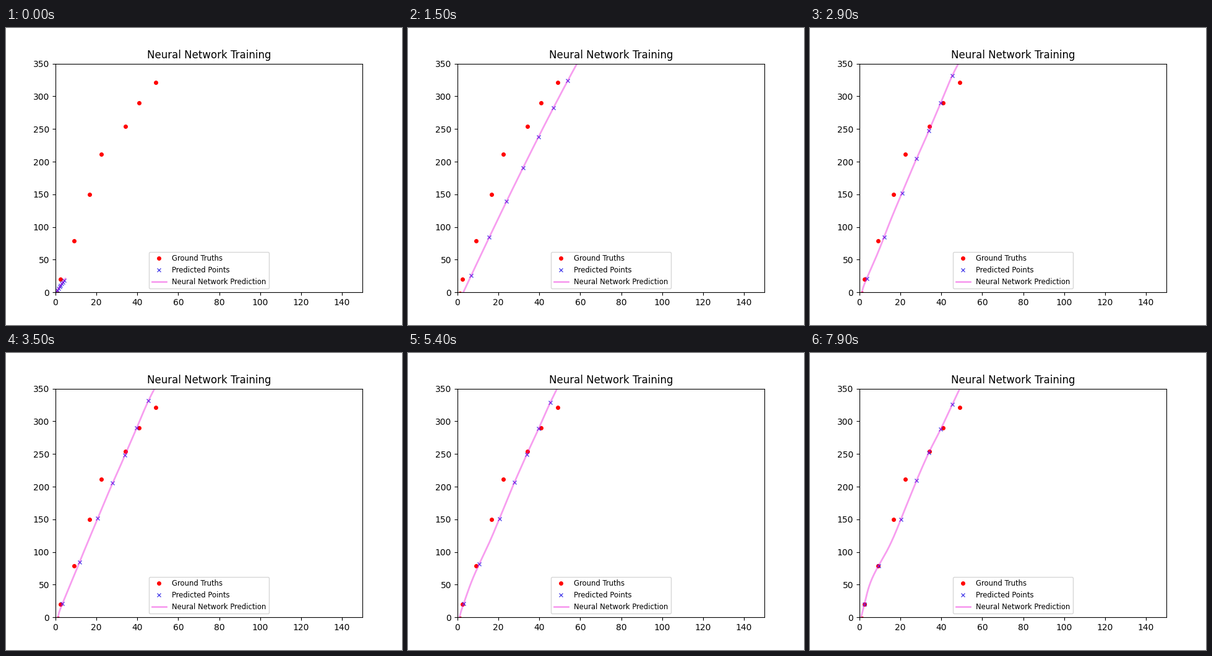
These frames come from a looping animation (640x480 px, 8000 ms). A matplotlib script:

```python
import numpy as np
import matplotlib.pyplot as plt
from matplotlib.animation import FuncAnimation

FRAMES = 80
STEP_MS = 100
MARKS = np.arange(8)                  # inputs of the predicted points
INPUTS = np.linspace(-1, 8.2, 300)    # inputs of the drawn curve

truth_x = [1.1, 2.4, 9.1, 16.6, 22.4, 34.2, 40.8, 49.0]
truth_y = [-1.3, 20, 78.8, 150, 211, 254, 290, 321.2]

# The curve both outputs finally settle on, at each mark
FINAL = np.array([[0.6, 2.4, 9.3, 20.2, 27.9, 33.9, 39.7, 45.4],
                  [-3, 20, 78.8, 149.8, 209.5, 252.1, 288, 326]])

# Early fits are parabolas: start frame, easing rate, x and y coefficients
EARLY = [(0, 0, [[0, 0.54, 0.4], [0, 2.43, 1]]),
         (4, 1.1, [[0, 17, 14], [0, 33, 24]]),
         (9, 1.3, [[-0.12, 10.75, 9.9], [-0.74, 46.9, 33.3]]),
         (15, 3.5, [[-0.19, 9.38, -2.5], [-1.73, 63.5, -36]])]
BEND_START = 29


def ease(u, rate):
    return u if rate == 0 else np.expm1(-rate * u) / np.expm1(-rate)


def catmull_rom(values, t):
    """Smooth curve through the marks, straight beyond both ends."""
    first, last = values[1] - values[0], values[-1] - values[-2]
    p = np.concatenate([values[0] + first * np.array([-2, -1]), values,
                        values[-1] + last * np.array([1, 2, 3])])
    i = np.floor(t).astype(int)
    u = t - i
    a, b, c, d = (p[i + k] for k in (1, 2, 3, 4))
    return b + 0.5 * u * (c - a + u * (2 * a - 5 * b + 4 * c - d
                                       + u * (3 * (b - c) + d - a)))


def parabola(coeffs, t):
    return np.array([np.polyval(c, t) for c in coeffs])


def settling(t, frame):
    """Final curve plus an error that fades out by the end of the loop."""
    left = np.clip((FRAMES - 1 - frame) / (FRAMES - 1 - BEND_START), 0, 1)
    x, y = (catmull_rom(v, t) for v in FINAL)
    x += 2.8 * left * np.exp(-((t - 1.85) / 0.9) ** 2)
    x += 0.9 * (1 - left) * np.sin(np.pi * (t - 2)) * np.exp(-(t - 2) ** 2)
    y += 6 * left * np.cos(2 * np.pi * (t - 2.05) / 4.9)
    return np.array([x, y])


def predict(t, frame):
    for k, (start, rate, coeffs) in enumerate(EARLY):
        is_last = k == len(EARLY) - 1
        end = BEND_START if is_last else EARLY[k + 1][0]
        if frame < end:
            a = parabola(coeffs, t)
            b = settling(t, frame) if is_last else parabola(EARLY[k + 1][2], t)
            return a + (b - a) * ease((frame - start) / (end - start), rate)
    return settling(t, frame)


fig, ax = plt.subplots(figsize=(6.4, 4.8), dpi=100)
ax.set_xlim(0, 150)
ax.set_ylim(0, 350)
ax.set_title("Neural Network Training")
ax.plot(truth_x, truth_y, "o", color="red", ms=4, label="Ground Truths")
points, = ax.plot([], [], "x", color="#2a20e6", ms=4, alpha=0.8,
                  label="Predicted Points")
line, = ax.plot([], [], color="#ed0dd9", lw=2, alpha=0.4,
                label="Neural Network Prediction")
ax.legend(loc="lower center", fontsize="small")


def update(frame):
    points.set_data(*predict(MARKS, frame))
    line.set_data(*predict(INPUTS, frame))
    return points, line


anim = FuncAnimation(fig, update, frames=FRAMES, interval=STEP_MS,
                     repeat=True, repeat_delay=0)
plt.show()
```
